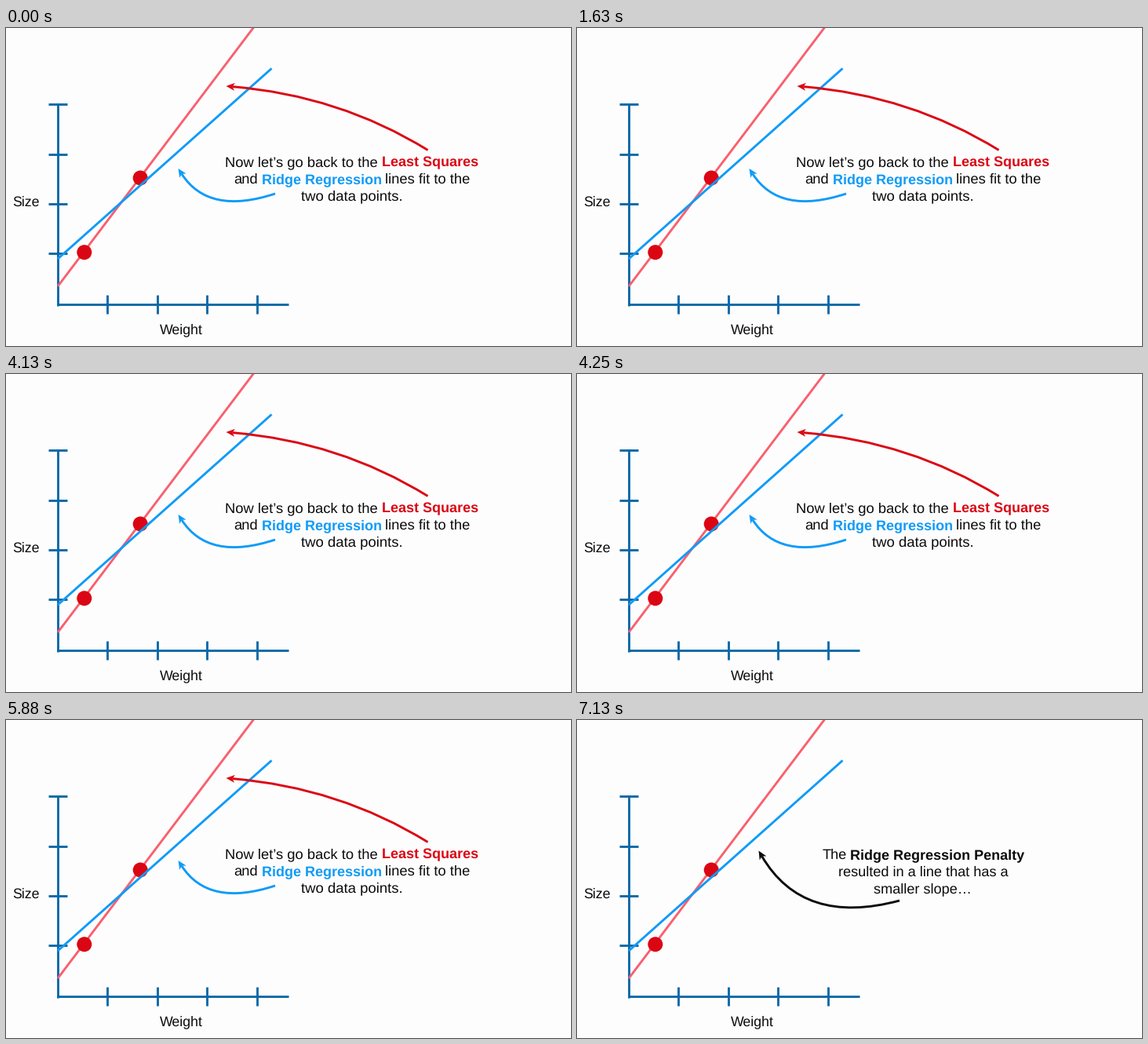
A matplotlib script that plays this animation: 720x405 px, repeating every 8 s.

```python
import numpy as np
import matplotlib as mpl
import matplotlib.pyplot as plt
from matplotlib.animation import FuncAnimation
from matplotlib.patches import Circle, PathPatch, Polygon
from matplotlib.path import Path

mpl.rcParams["font.family"] = "Liberation Sans"
mpl.rcParams["text.hinting"] = "none"
mpl.rcParams["toolbar"] = "None"

W, H, DPI = 720, 405, 100
STEP, LOOP, SWITCH = 125, 8000, 6000  # ms

AXIS = "#0b69a7"
RED, PINK = "#db0613", "#f9606e"
BLUE, INK = "#0f9bf8", "#0b0b0b"

fig = plt.figure(figsize=(W / DPI, H / DPI), dpi=DPI, facecolor="#fefdfe")
ax = fig.add_axes([0, 0, 1, 1])
ax.set_xlim(0, W)
ax.set_ylim(H, 0)
ax.axis("off")


def px(size):
    return size * 72 / DPI


def line(x0, y0, x1, y1, color, width=2.9, z=1):
    ax.plot([x0, x1], [y0, y1], color=color, lw=px(width),
            solid_capstyle="butt", zorder=z)


def label(x, y, text, size=18.1, color=INK, bold=False):
    return ax.text(x, y, text, fontsize=px(size), color=color, va="baseline",
                   weight="bold" if bold else "normal", zorder=5)


def arrow(start, bend, tip, color, width=2.9):
    """Quadratic curve with a notched head at its tip."""
    start, bend, tip = (np.array(p, float) for p in (start, bend, tip))
    d = (tip - bend) / np.linalg.norm(tip - bend)
    n = np.array([-d[1], d[0]])
    neck = tip - 8 * d
    curve = PathPatch(Path([start, bend, neck], [1, 3, 3]), fc="none",
                      ec=color, lw=px(width), capstyle="butt", zorder=4)
    head = Polygon([tip, tip - 11 * d + 5 * n, neck, tip - 11 * d - 5 * n],
                   fc=color, ec="none", zorder=4)
    return [ax.add_patch(curve), ax.add_patch(head)]


# Axes with ticks
line(66, 96, 66, 353.5, AXIS)
line(65, 352, 360, 352, AXIS)
for k in range(4):
    line(54, 97.2 + 63.4 * k, 78, 97.2 + 63.4 * k, AXIS)
    line(129.4 + 63.4 * k, 340, 129.4 + 63.4 * k, 364, AXIS)
label(8.3, 227.3, "Size", 17.7)
label(196, 389, "Weight", 17.7)

# Data points and fitted lines
line(66, 329, 316.5, -2, PINK, z=2)
for x, y in [(99.8, 285.7), (171.2, 191)]:
    ax.add_patch(Circle((x, y), 9.5, fc=RED, ec="none", zorder=3))
line(66, 294, 338.5, 51.5, BLUE, z=3.5)

intro = [
    label(278.8, 176.3, "Now let’s go back to the", 18.4),
    label(479.2, 176.3, "Least Squares", 18.05, RED, True),
    label(290.5, 198, "and", 18.4),
    label(325.6, 198, "Ridge Regression", 18.05, BLUE, True),
    label(482.8, 198, "lines fit to the", 18.4),
    label(375.8, 219.6, "two data points.", 18.5),
    *arrow((537.5, 155.5), (425, 86), (280.5, 74), RED),
    *arrow((343, 211), (258, 239), (219.5, 179), BLUE),
]

penalty = [
    label(312.8, 176.8, "The", 18.1),
    label(348, 176.8, "Ridge Regression Penalty", 17.95, INK, True),
    label(332.8, 198.4, "resulted in a line that has a", 18.1),
    label(378.4, 220, "smaller slope…", 18.2),
    *arrow((411, 230), (288, 263), (231.5, 166.5), INK),
]


def update(i):
    late = i * STEP >= SWITCH
    for part in intro:
        part.set_visible(not late)
    for part in penalty:
        part.set_visible(late)
    return intro + penalty


anim = FuncAnimation(fig, update, frames=LOOP // STEP, interval=STEP,
                     repeat=True, repeat_delay=0, blit=False)
plt.show()
```
